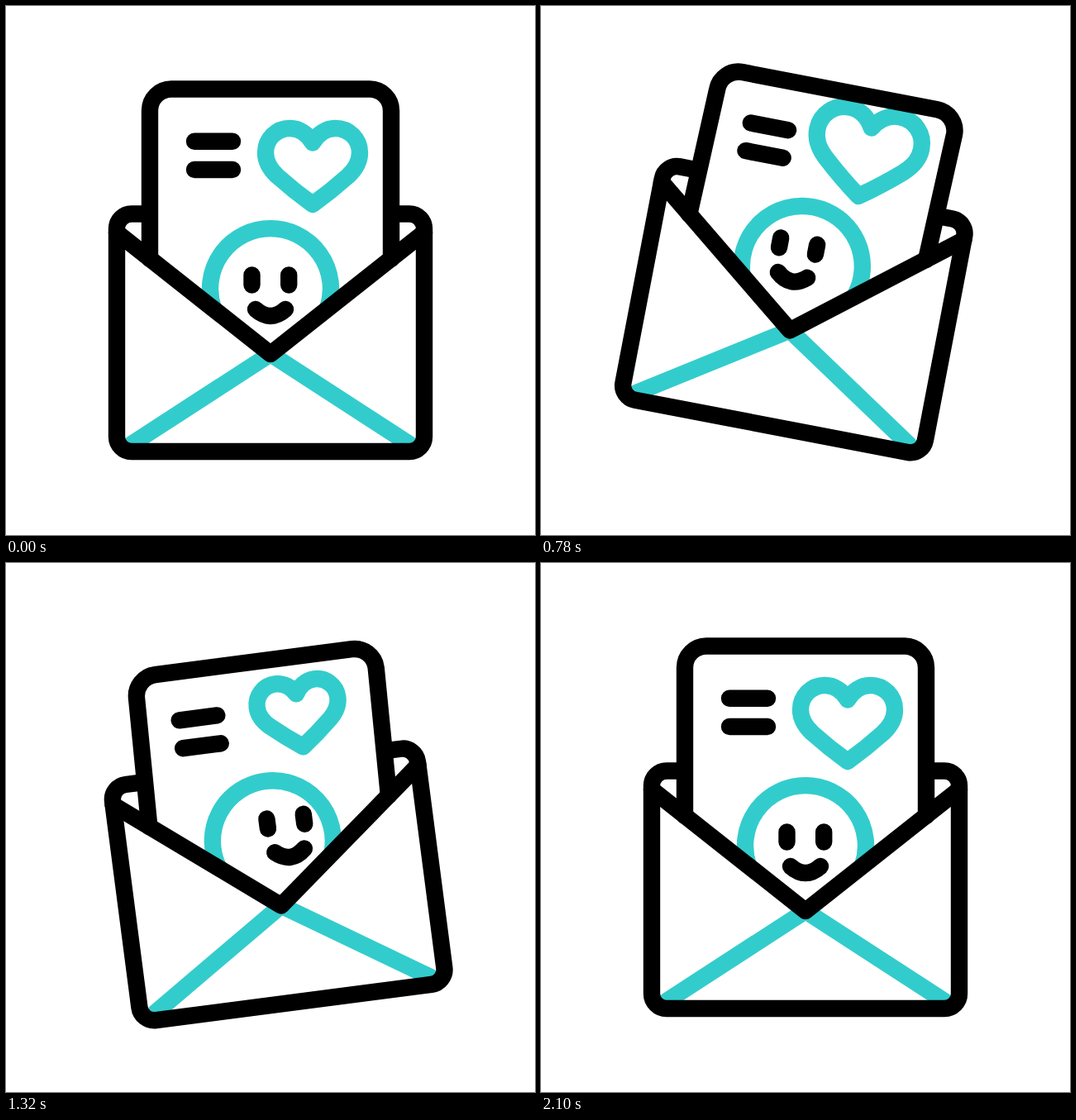
These frames come from a looping animation (640x640 px, 2.4 s). An HTML page:

```html
<!DOCTYPE html>
<html lang="en">
<head>
<meta charset="utf-8">
<title>Love letter</title>
<style>
  html, body { margin: 0; width: 100%; height: 100%; overflow: hidden; background: #fff; }
  svg { display: block; width: 100%; height: 100%; }
  .line { fill: none; stroke: #000; stroke-width: 20.4; stroke-linecap: round; stroke-linejoin: round; }
  .teal { stroke: #3cc; }
</style>
</head>
<body>
<svg viewBox="0 0 640 640">
  <g id="letter" class="line">
    <path id="heart" class="teal" d="M0-28.5C-6-39-16-46-27.5-46C-44-46-57-33-57-16.5C-57-5-52 3-43 11.5C-29 24-14 36 0 46C14 36 29 24 43 11.5C52 3 57-5 57-16.5C57-33 44-46 27.5-46C16-46 6-39 0-28.5Z"/>
    <path class="teal" d="M251 366A73 73 0 1 1 389 366"/>
    <path id="lines" d="M228 163.800H274M228 198H274"/>
    <path id="face" d="M297.5 325.5V337.5M342.200 325.5V337.5M302 367Q320 383 338 367"/>
    <path class="teal" d="M152 530L320 421L488 530"/>
    <path id="card"/>
    <path d="M171 251.5H152a18 18 0 0 0-18 18V521a18 18 0 0 0 18 18H488a18 18 0 0 0 18-18V269.5a18 18 0 0 0-18-18H471"/>
    <path d="M134 274L320 421L506 274"/>
  </g>
</svg>
<script>
const LOOP = 2400;
const START = 5;
const el = id => document.getElementById(id);
const [letter, heart, lines, face, card] = ['letter', 'heart', 'lines', 'face', 'card'].map(el);

// Smooth step from 0 to 1 between two times.
function ramp(t, from, to) {
  const u = Math.min(1, Math.max(0, (t - from) / (to - from)));
  return u * u * (3 - 2 * u);
}

// Eases through evenly spaced turning points.
function swing(t, step, points) {
  return points.reduce((sum, p, i) => {
    if (!i) return p;
    const end = START + i * step;
    return sum + (p - points[i - 1]) * ramp(t, end - step, end);
  }, 0);
}

// The rocking slows down unevenly, so each turn has its own span.
const rock = t =>
  -18.3 * ramp(t, START, 375) +
  35.1 * ramp(t, 375, 925) -
  25 * ramp(t, 925, 1260) +
  12.7 * ramp(t, 1260, 1658) -
  4.5 * ramp(t, 1658, 2090);

// The lower ends stay in the envelope while the top edge shifts.
function cardPath(sink) {
  const x = 5 * sink, y = 25 * sink;
  return `M174 306L${174 + x} ${126.5 + y}a26 26 0 0 1 26-26H${440 + x}a26 26 0 0 1 26 26L466 306`;
}

const move = (node, x, y, more = '') =>
  node.setAttribute('transform', `translate(${x} ${y}) ${more}`);

function draw(t) {
  const drop = swing(t, 350, [0, 54, -38, 55, -16, 15.5, 0]);
  const beat = swing(t, 375, [1, 0.72, 1.13, 0.72, 1]);
  const sink = ramp(t, 240, 830) - ramp(t, 1240, 1850);

  const away = ramp(t, START, 480);
  const across = ramp(t, 600, 1120);
  const back = ramp(t, 1200, 1720);

  move(letter, 0, drop, `rotate(${rock(t)} 320 320)`);
  move(heart, 371, 194, `scale(${beat})`);
  heart.style.strokeWidth = 20.4 / beat;
  move(lines, -1.5 * sink, 20 * sink);
  move(face, -21 * away + 42.5 * across - 21.5 * back, 12.5 * (back - away));
  card.setAttribute('d', cardPath(sink));
}

function tick() {
  draw(performance.now() % LOOP);
  requestAnimationFrame(tick);
}
tick();
</script>
</body>
</html>
```
